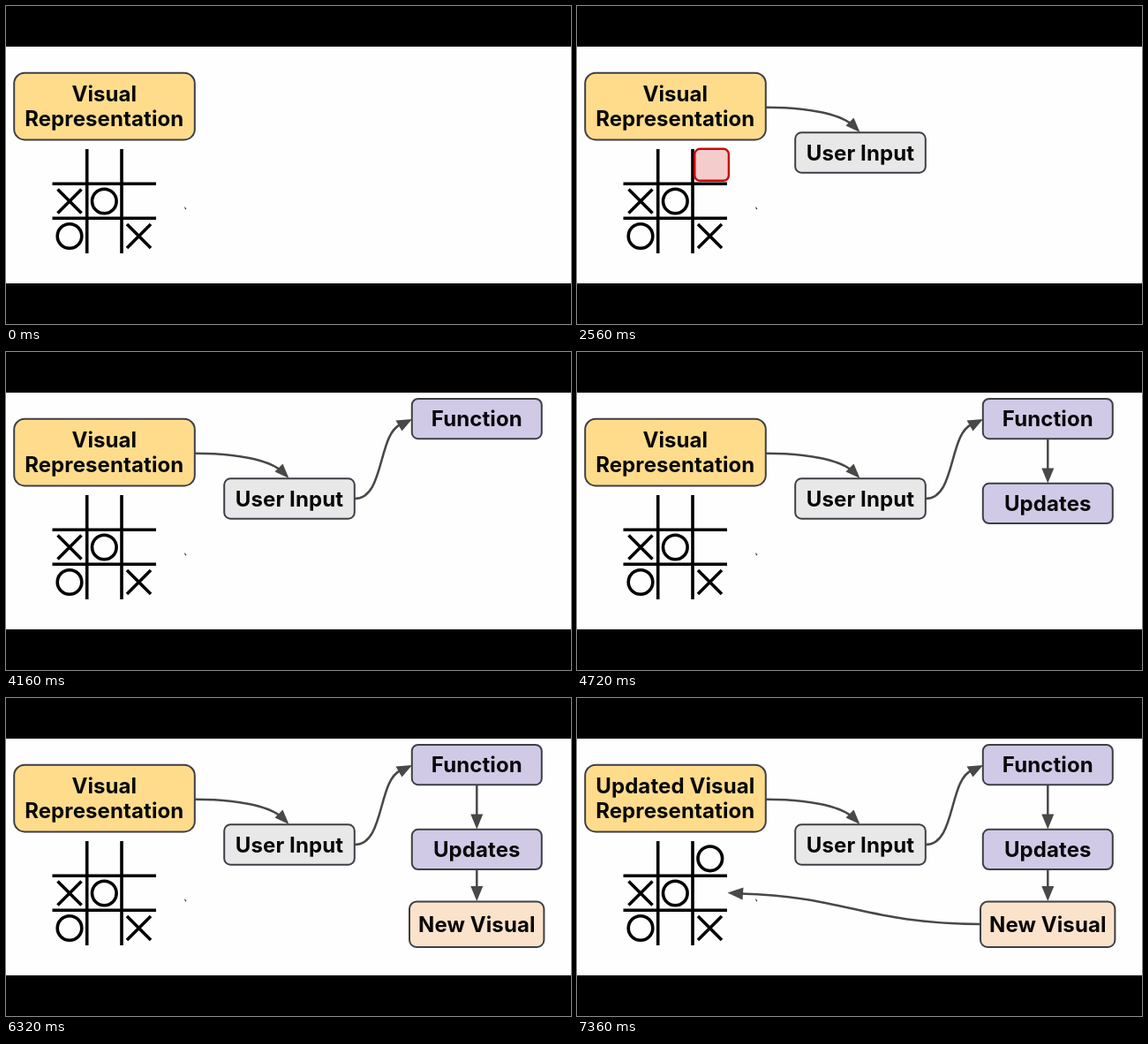
An HTML page that plays this animation: 640 by 360 pixels, repeating every 7440 ms.

```html
<!DOCTYPE html>
<html lang="en">
<head>
<meta charset="utf-8">
<title>Update cycle</title>
<style>
  html, body { margin: 0; width: 100%; height: 100%; overflow: hidden; background: #000; }
  svg { display: block; width: 640px; height: 360px; }
  text { font: 700 24px Inter, sans-serif; letter-spacing: .1px; text-anchor: middle; fill: #080808; }
  .box { stroke: #3c4046; stroke-width: 2; }
  .line { fill: none; stroke: #484848; stroke-width: 2.5; }
  .head { fill: #484848; }
  .ink { fill: none; stroke: #000; stroke-width: 3.6; }
</style>
</head>
<body>
<svg id="stage" viewBox="0 0 640 360"></svg>
<script>
const LOOP = 7440;
const INPUT = 1200, PICK = 2080, CALL = 2800, UPDATE = 4400, RENDER = 5920, RETURN = 6640, DONE = 6880;

const label = (x, y, s) => `<text x="${x}" y="${y}">${s}</text>`;
const box = (x, y, w, h, r, fill) =>
  `<rect class="box" x="${x}" y="${y}" width="${w}" height="${h}" rx="${r}" fill="${fill}"/>`;
const arrow = (path, head) =>
  `<path class="line" d="${path}"/><path class="head" d="M${head}Z"/>`;
const cross = (x, y) =>
  `<path class="ink" d="M${x - 13.5} ${y - 13.5}l27 27m0-27l-27 27"/>`;
const ring = (x, y) => `<circle class="ink" cx="${x}" cy="${y}" r="13.8"/>`;

const YELLOW = '#ffdc8c', GRAY = '#e8e8e8', PURPLE = '#d0cae6', PEACH = '#fbe2ca';

// Each layer: start, end, markup
const layers = [
  [0, LOOP,
    '<rect y="46" width="640" height="268" fill="#fefefe"/>' +
    box(9.2, 75.8, 204.6, 75.6, 12, YELLOW) +
    label(111.3, 136, 'Representation') +
    '<path class="ink" d="M91.7 162V280M131 162V280M52.5 201.3H170M52.5 240.3H170"/>' +
    cross(72, 221) + ring(111.3, 221) + ring(72, 260.5) + cross(150.5, 260.5)],
  [0, DONE, label(111.3, 108.3, 'Visual')],
  [INPUT, LOOP,
    arrow('M214 114.8C262 115 297 122 311 134', '320.5 143L304.5 135.5L313.5 126.5') +
    box(247.2, 143.3, 147.6, 45.4, 7, GRAY) + label(321, 175, 'User Input')],
  [PICK, CALL,
    '<rect x="133.3" y="161.8" width="38.6" height="36" rx="6" fill="#f4cccc" stroke="#cc0808" stroke-width="2.4"/>'],
  [CALL, LOOP,
    arrow('M395 166C429 166 421 93 447 82', '460 76L441.5 77.5L448.5 89.5') +
    box(459.8, 53, 147, 45.2, 7, PURPLE) + label(533.3, 84.3, 'Function')],
  [UPDATE, LOOP,
    arrow('M533.3 99V134', '533.3 148.5L526.3 131.5H540.3') +
    box(459.8, 148.8, 147, 45.2, 7, PURPLE) + label(533.3, 180, 'Updates')],
  [RENDER, LOOP,
    arrow('M533.3 195V215', '533.3 230L526.3 213H540.3') +
    box(457, 230.6, 152.4, 51.4, 8, PEACH) + label(533.3, 265, 'New Visual')],
  [RETURN, LOOP,
    arrow('M456 256C326 255 306 225 186 221.4', '170.5 220.5L188.5 214.5L187.5 228.5')],
  [DONE, LOOP, label(111.3, 108.3, 'Updated Visual') + ring(150.8, 181.8)],
  [0, LOOP, '<path d="M202 227l2.2 2.2-.4 1.4-1-.8z" fill="#222"/>']
];

const stage = document.getElementById('stage');
stage.innerHTML = layers.map(l => `<g>${l[2]}</g>`).join('');
const groups = [...stage.children];

function draw(now) {
  const t = now % LOOP;
  layers.forEach(([from, to], i) => {
    groups[i].style.display = t >= from && t < to ? '' : 'none';
  });
}

const start = performance.now();
function tick() {
  draw(performance.now() - start);
  requestAnimationFrame(tick);
}
tick();
</script>
</body>
</html>
```
